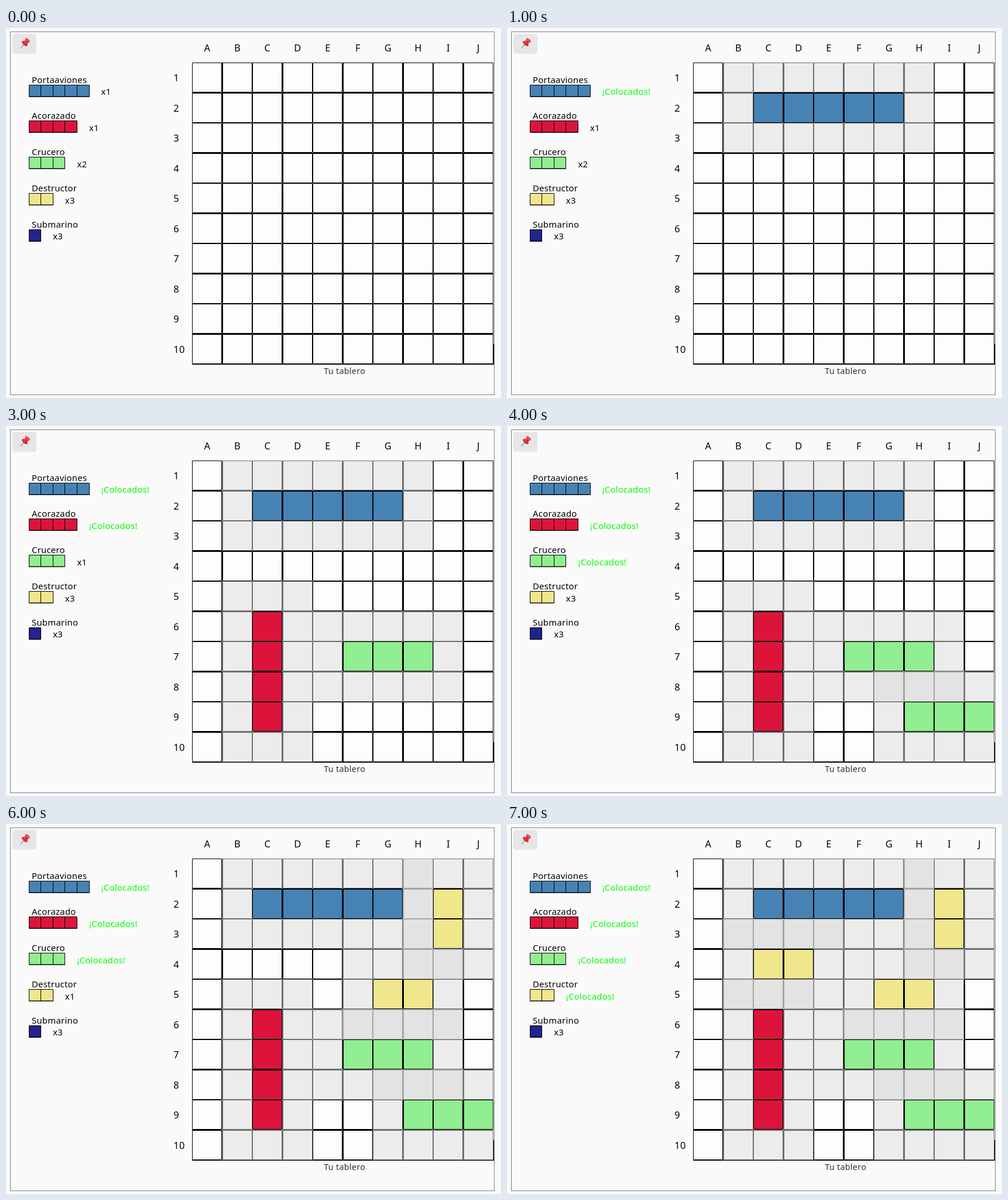
Recreate the animation shown at these times as an HTML page. Size 846 px wide and 632 px high, loop 8000 ms.

```html
<!DOCTYPE html>
<html lang="es">
<head>
<meta charset="utf-8">
<title>Tu tablero</title>
<style>
  html, body { margin: 0; width: 100%; height: 100%; overflow: hidden; background: #fafafa; }
  svg { display: block; width: 846px; height: 632px; }
  text { font-family: "Noto Sans", sans-serif; font-size: 14.9px; letter-spacing: .24px; }
  .axis { font-size: 16.48px; letter-spacing: .5px; }
  .caption { font-size: 14.42px; letter-spacing: .26px; fill: #333; }
  .mid { text-anchor: middle; }
  .done { fill: #0f0; }
</style>
</head>
<body>
<svg viewBox="0 0 846 632">
  <rect x="7.5" y="6.5" width="827" height="620" fill="none" stroke="#808080"/>
  <rect x="11" y="10" width="41" height="34" rx="4.5" fill="#e6e6e6"/>
  <g transform="translate(32 26.5) rotate(42)">
    <path d="M-.8 2h1.6L.4 11.5h-.8z" fill="#84939c"/>
    <path d="M-3.2-7h6.4l.6 6.5h-7.6z" fill="#c62828"/>
    <ellipse cy="0" rx="6" ry="2.9" fill="#dc2c35"/>
    <ellipse cy="-7.2" rx="4.8" ry="2.4" fill="#f04a4e"/>
    <path d="M-1.8-4.5v4" stroke="#f4777a" stroke-width="1.2"/>
  </g>
  <g id="board"></g>
  <g id="legend"></g>
  <path d="M318 574.5h516M833.5 540v35" stroke="#000" fill="none"/>
  <path d="M833 244.5h2M833 250.5h2" stroke="#bbb"/>
  <g id="labels"></g>
</svg>
<script>
const PITCH = 51.5, LEFT = 318, TOP = 59, SMALL = 20.6, STEP = 1000, STEPS = 8;

const types = [
  { name: 'Portaaviones', size: 5, count: 1, color: '#4682b4' },
  { name: 'Acorazado', size: 4, count: 1, color: '#dc143c' },
  { name: 'Crucero', size: 3, count: 2, color: '#90ee90' },
  { name: 'Destructor', size: 2, count: 3, color: '#f0e68c' },
  { name: 'Submarino', size: 1, count: 3, color: '#23238e' }
];

// One ship is placed per step: type, column, row, vertical
const ships = [
  [0, 2, 1, 0], [1, 2, 5, 1], [2, 5, 6, 0], [2, 7, 8, 0],
  [3, 8, 1, 1], [3, 6, 4, 0], [3, 2, 3, 0]
];

const $ = id => document.getElementById(id);
const text = (x, y, s, cls = '') => `<text x="${x}" y="${y}" class="${cls}">${s}</text>`;
const rect = (x, y, w, h, fill, more = '') =>
  `<rect x="${x}" y="${y}" width="${w}" height="${h}" fill="${fill}" ${more}/>`;

function boardCell(c, r, color, shade) {
  const x = LEFT + Math.floor(PITCH * c), y = TOP + Math.floor(PITCH * r);
  const dx = c % 2, dy = r % 2;
  let out = rect(x, y, 51 + dx, 51 + dy, '#000', 'rx="1.2"') +
            rect(x + 1 + dx, y + 1 + dy, 49, 49, color || '#fdfdfd');
  if (!color)
    while (shade-- > 0) out += rect(x, y, 51 + dx, 51 + dy, 'gainsboro', 'opacity=".5"');
  return out;
}

function drawBoard(step) {
  const color = {}, shade = {};
  for (const [t, c, r, vertical] of ships.slice(0, step)) {
    const w = vertical ? 1 : types[t].size, h = vertical ? types[t].size : 1;
    for (let y = r - 1; y <= r + h; y++)
      for (let x = c - 1; x <= c + w; x++) {
        const key = x + ',' + y;
        const inside = x >= c && x < c + w && y >= r && y < r + h;
        if (inside) color[key] = types[t].color;
        else shade[key] = (shade[key] || 0) + 1;
      }
  }
  let out = '';
  for (let r = 0; r < 10; r++)
    for (let c = 0; c < 10; c++) {
      const key = c + ',' + r;
      out += boardCell(c, r, color[key], shade[key] || 0);
    }
  $('board').innerHTML = out;
}

function drawLegend(step) {
  $('legend').innerHTML = types.map((type, i) => {
    const y = Math.floor(97 + 61.8 * i);
    let out = text(44, 93.6 + 61.8 * i, type.name);
    for (let j = 0; j < type.size; j++) {
      const x = Math.floor(39 + SMALL * j), end = Math.floor(39 + SMALL * (j + 1));
      out += rect(x, y, end - x + 1, 21, '#000', 'rx=".8"') +
             rect(x + 1, y + 1, end - x - 1, 18.6, type.color);
    }
    const left = type.count - ships.slice(0, step).filter(s => s[0] === i).length;
    const x = 39 + SMALL * (type.size + 1);
    return out + text(x, 114.2 + 61.8 * i, left ? 'x' + left : '¡Colocados!', left ? '' : 'done');
  }).join('');
}

$('labels').innerHTML = [...'ABCDEFGHIJ'].map((ch, i) =>
  text(LEFT + PITCH * (i + .5) + .25, 40, ch, 'axis mid') +
  text(286.2, 91.3 + PITCH * i, i + 1, 'axis')
).join('') + text(578.7, 591, 'Tu tablero', 'caption mid');

let shown = -1;
function tick(now) {
  const step = Math.floor(now / STEP) % STEPS;
  if (step !== shown) {
    shown = step;
    drawBoard(step);
    drawLegend(step);
  }
  requestAnimationFrame(() => tick(performance.now()));
}
tick(performance.now());
</script>
</body>
</html>
```
